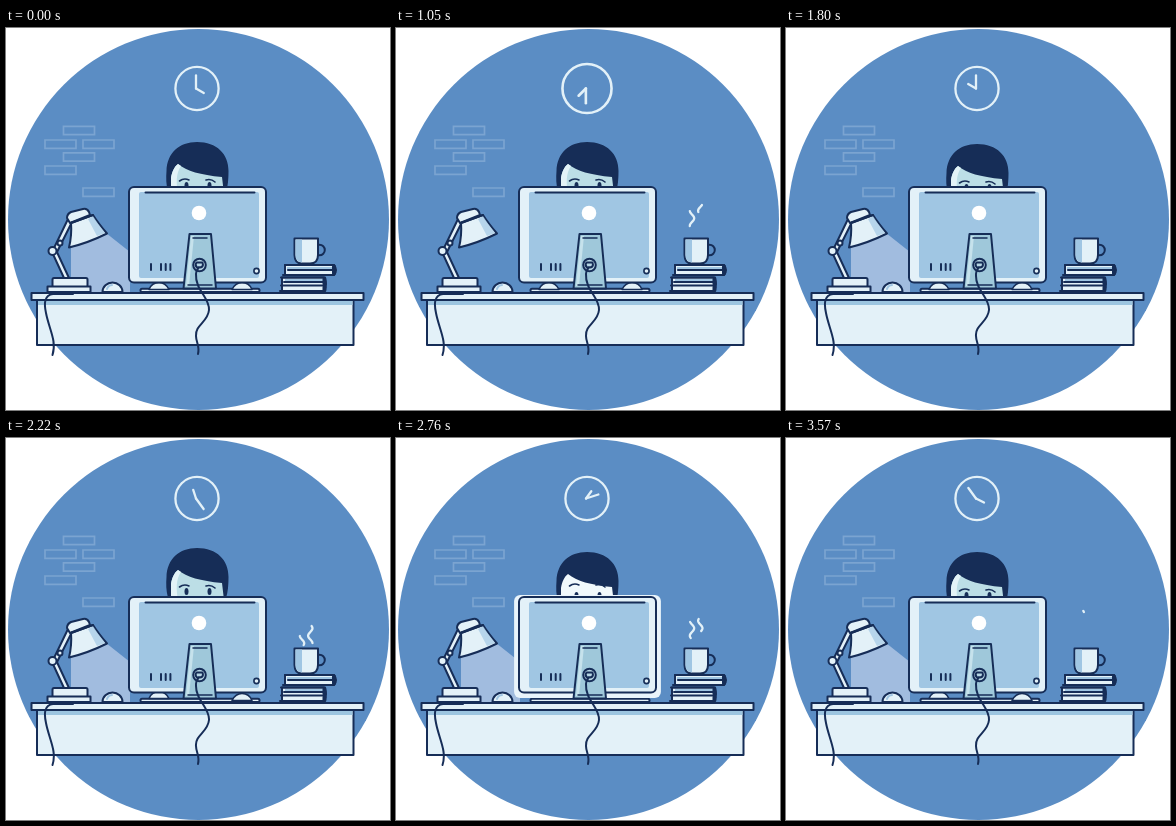
Recreate the animation shown at these times as an HTML page. Size 384x382 px, loop 3.6 s.

```html
<!DOCTYPE html>
<html lang="en">
<head>
<meta charset="utf-8">
<title>Late at the desk</title>
<style>
html, body { margin: 0; width: 100%; height: 100%; overflow: hidden; background: #fff; }
svg { display: block; width: 100vw; height: 100vh; }
.ink { stroke: #162d57; stroke-width: 2; stroke-linecap: round; stroke-linejoin: round; }
.pale { fill: #e3f1f8; }
.mid { fill: #a0c6e3; }
.line { fill: none; }
.chalk { fill: none; stroke: #e3f1f8; stroke-linecap: round; stroke-linejoin: round; }
</style>
</head>
<body>
<svg viewBox="0 0 384 382">
  <circle cx="192.5" cy="191.5" r="190.5" fill="#5b8dc4"/>
  <path fill="none" stroke="#7ba4d1" stroke-width="1.7" d="M57.5 98.3h31v8.4h-31z M39 112h31v8.4H39z M77 112h31v8.4H77z M57.5 124.8h31v8.4h-31z M39 138h31v8.4H39z M77 160h31v8.4H77z"/>

  <g id="clock" class="chalk" stroke-width="2.3">
    <circle r="21.6"/>
    <path id="minute" d="M0 0V-13" transform="translate(-1 0)"/>
    <path id="hour" d="M0 0V-9"/>
  </g>

  <path id="beam" fill="#a1bcdf" d="M65 218L100 205L124 224V265H84L65 250Z"/>

  <g id="head">
    <path fill="#162d57" d="M162 164C160 156 160 150 160.500 143C161 125 173 114 191 114C211 114 222.500 126 222.500 143C222.500 150 222 158 220 164Z"/>
    <path id="face" d="M165 166V150C166 144 168 139 172 136C181 143 194 147 216 149L218 166Z"/>
    <path id="cheek" fill="#e3f3f7" d="M165 166V150C166 144 168 139 172 136L175 138C170 145 170 155 172 166Z"/>
    <g id="brows" class="ink line" stroke-width="1.8" style="stroke-width:1.6">
      <path d="M173.500 153Q178 149.500 183 152M200 152Q205 150.500 209 154"/>
    </g>
    <g fill="#162d57">
      <ellipse cx="180.500" cy="157.500" rx="2" ry="3.500"/>
      <ellipse cx="203.500" cy="157.500" rx="2" ry="3.500"/>
    </g>
  </g>

  <!-- desk -->
  <g class="ink pale">
    <path d="M31 272H347.500V317H31Z"/>
    <path d="M32 273H346.500V277H32Z" fill="#9cc5e0" stroke="none"/>
    <rect x="25.500" y="265" width="332" height="7"/>
  </g>

  <!-- lamp -->
  <g class="ink pale">
    <path d="M48 220L62 191L66 194L51 224Z"/>
    <path d="M46 224L58 250H63L50 222Z"/>
    <circle cx="46.500" cy="223" r="4"/>
    <circle cx="54" cy="215" r="2.500"/>
    <path d="M61 190Q61 186 65 184L77 181Q81 180 83 184L84 187L64 195Z"/>
    <path d="M65 195L87 187Q92 195 101 205.500Q82 215 63 219.500Q66 207 65 195Z"/>
    <path d="M82 191L87 188Q92 196 99 205L91 208Z" fill="#a0c6e3" stroke="none" opacity=".65"/>
    <path class="line" d="M65 195L87 187"/>
    <rect x="46.500" y="250" width="35" height="9" rx="1.500"/>
    <rect x="41.500" y="258.500" width="43" height="5.500"/>
  </g>
  <g class="ink pale">
    <path d="M96.500 264A10 9.500 0 0 1 116.500 264Z"/>
    <path d="M101 261Q102 257.500 106 257" class="line" style="stroke:#a0c6e3"/>
  </g>
  <path class="ink line" d="M67 266H47C38 267 38 276 40 285C43 301 51 313 46.500 327"/>

  <!-- keyboard and hands -->
  <rect class="ink pale" x="134.500" y="260.800" width="119" height="3.200" rx="1.500"/>
  <g class="ink pale" style="stroke-width:1.500">
    <path id="left" d="M143 261C145 256 148 254 153 254C158 254 161 257 163 261Z"/>
    <path id="right" d="M226 261C228 257 231 254 236 254C241 254 244 256 246 261Z"/>
  </g>

  <!-- monitor -->
  <rect id="halo" fill="#e9f4fb"/>
  <g class="ink">
    <rect class="pale" x="123" y="159" width="137" height="95.500" rx="5"/>
    <rect class="mid" x="133" y="164" width="120" height="86" rx="2" stroke="none"/>
    <path class="line" d="M139.500 164.500H248.500M145 236V242M155 236V242M159.700 236V242M164.400 236V242"/>
    <circle class="pale" cx="250.500" cy="243" r="2.600" style="stroke-width:1.600"/>
    <circle cx="193" cy="185" r="7.300" fill="#fff" stroke="none"/>
    <path d="M183.500 206H205L210 260.500H177.500Z" fill="#9fc8da"/>
    <path d="M185 208H188L183 258H180Z" fill="#c6e2ec" stroke="none"/>
    <path class="line" d="M187 210H201M182 257H206" style="stroke-width:1.500"/>
    <circle cx="193.500" cy="237" r="6.300" fill="#b7d7e5"/>
    <path class="line" d="M190.500 234.500H196.500Q198 239 194 239.500H191Q188.500 237 190.500 234.500ZM193 239C191 242 190 243 190 246C189 262 204 270 203 282C202 294 189 297 190 308C190 314 194 318 192 326"/>
  </g>

  <!-- books and cup -->
  <g class="ink pale">
    <path d="M279 237H328Q332 242 328 247H279Z"/>
    <path d="M276 249.500H318Q322 256 318 263H276Z"/>
    <path d="M281 239H326V242H281ZM279 251H317V254H279Z" fill="#a0c6e3" stroke="none"/>
    <path class="line" d="M279 237H328M277 247H328M282 242H326M275 249.500H319M278 254H317M275 257.500H318M274 263H319"/>
    <path class="line" d="M328 238.500V245.500M318.500 251V256M318.500 259V262" style="stroke-width:4"/>
  </g>
  <g class="ink">
    <circle class="line" cx="313.500" cy="222" r="5.300"/>
    <path class="pale" d="M288.500 210.500H312V227Q312 235.500 304 235.500H296Q288.500 235.500 288.500 227Z"/>
    <path class="mid" d="M289.500 211.500H296V234.500Q289.500 234 289.500 227Z" stroke="none"/>
  </g>
  <g class="chalk" stroke-width="2.300"><path id="wispA"/><path id="wispB"/></g>
</svg>
<script>
const LOOP = 3600, STEP = 30;
const el = {};
for (const node of document.querySelectorAll('[id]')) el[node.id] = node;
const set = (id, attrs) => { for (const k in attrs) el[id].setAttribute(k, attrs[k]); };

// Eased interpolation through [time, value] pairs.
function track(keys, t) {
  if (t <= keys[0][0]) return keys[0][1];
  for (let i = 1; i < keys.length; i++) {
    const [b, end] = keys[i], [a, start] = keys[i - 1];
    if (t < b) {
      const p = (t - a) / (b - a);
      return start + (end - start) * p * p * (3 - 2 * p);
    }
  }
  return keys[keys.length - 1][1];
}

const within = (spans, t) => spans.some(([a, b]) => t >= a && t < b);

// Sum of humps given as [start, end, height].
const humps = (list, t) => list.reduce((sum, [a, b, h]) =>
  t > a && t < b ? sum + h * Math.sin(Math.PI * (t - a) / (b - a)) : sum, 0);

const lampOff = [[1020, 1080], [2850, 2910]];
const flashes = [[390, 600, 4], [1230, 1350, 5], [2640, 2850, 4], [3300, 3360, 1.5]];
const ticks = [[390, 630, 0.15], [960, 1170, 0.14], [2340, 2580, 0.32], [2970, 3300, 0.15]];
const nod = [[240, 0], [390, -4], [660, -4], [810, 0]];
const dip = [[1560, 0], [1740, 2], [1860, 2], [2040, 0]];

// Vertical extent of each steam wisp over half a loop.
const steamA = {
  x: 296,
  tip: [[300, 207], [450, 197], [960, 184], [1500, 173]],
  tail: [[450, 207], [960, 200], [1050, 198], [1770, 174], [1800, 172]]
};
const steamB = {
  x: 304.3,
  tip: [[240, 206], [450, 187], [960, 181], [1050, 177]],
  tail: [[450, 205], [960, 193], [1050, 184], [1200, 177]]
};

function wisp({ x, tip, tail }, t) {
  const top = track(tip, t), bottom = track(tail, t);
  if (bottom - top < 0.5) return '';
  const points = [];
  for (let i = 0; i <= 16; i++) {
    const y = bottom + (top - bottom) * i / 16;
    points.push((x + 2.2 * Math.sin((y - 186.5) * Math.PI / 7.5)).toFixed(2) + ' ' + y.toFixed(2));
  }
  return 'M' + points.join('L');
}

function draw(t) {
  const half = t % (LOOP / 2);

  set('clock', { transform: `translate(191 60.500) scale(${1 + humps(ticks, t)})` });
  set('minute', { transform: `translate(-1 0) rotate(${t / LOOP * 360 * 12})` });
  set('hour', { transform: `translate(-1 0) rotate(${120 + t / LOOP * 360})` });

  set('beam', { visibility: within(lampOff, t) ? 'hidden' : 'visible' });

  const lit = within(flashes, t);
  const glow = humps(flashes, t);
  set('halo', {
    x: 122 - glow, y: 158 - glow / 4,
    width: 139 + 2 * glow, height: 99 + glow, rx: 6,
    visibility: lit ? 'visible' : 'hidden'
  });
  set('face', { fill: lit ? '#f1f9fc' : '#bcdee6' });
  set('cheek', { visibility: lit ? 'hidden' : 'visible' });

  set('head', { transform: `translate(0 ${track(nod, half) + track(dip, t)})` });
  set('brows', { transform: `translate(0 ${humps([[2610, 2910, -5]], t)})` });

  const beat = Math.sin(t / 150 * 2 * Math.PI);
  const hands = lit ? 'hidden' : 'visible';
  set('left', { transform: `translate(0 ${0.5 + beat})`, visibility: hands });
  set('right', { transform: `translate(0 ${0.5 - beat})`, visibility: hands });

  set('wispA', { d: wisp(steamA, half) });
  set('wispB', { d: wisp(steamB, half) });
}

const start = performance.now();
function tick() {
  const t = (performance.now() - start) % LOOP;
  draw(Math.floor(t / STEP) * STEP);
  requestAnimationFrame(tick);
}
tick();
</script>
</body>
</html>
```
